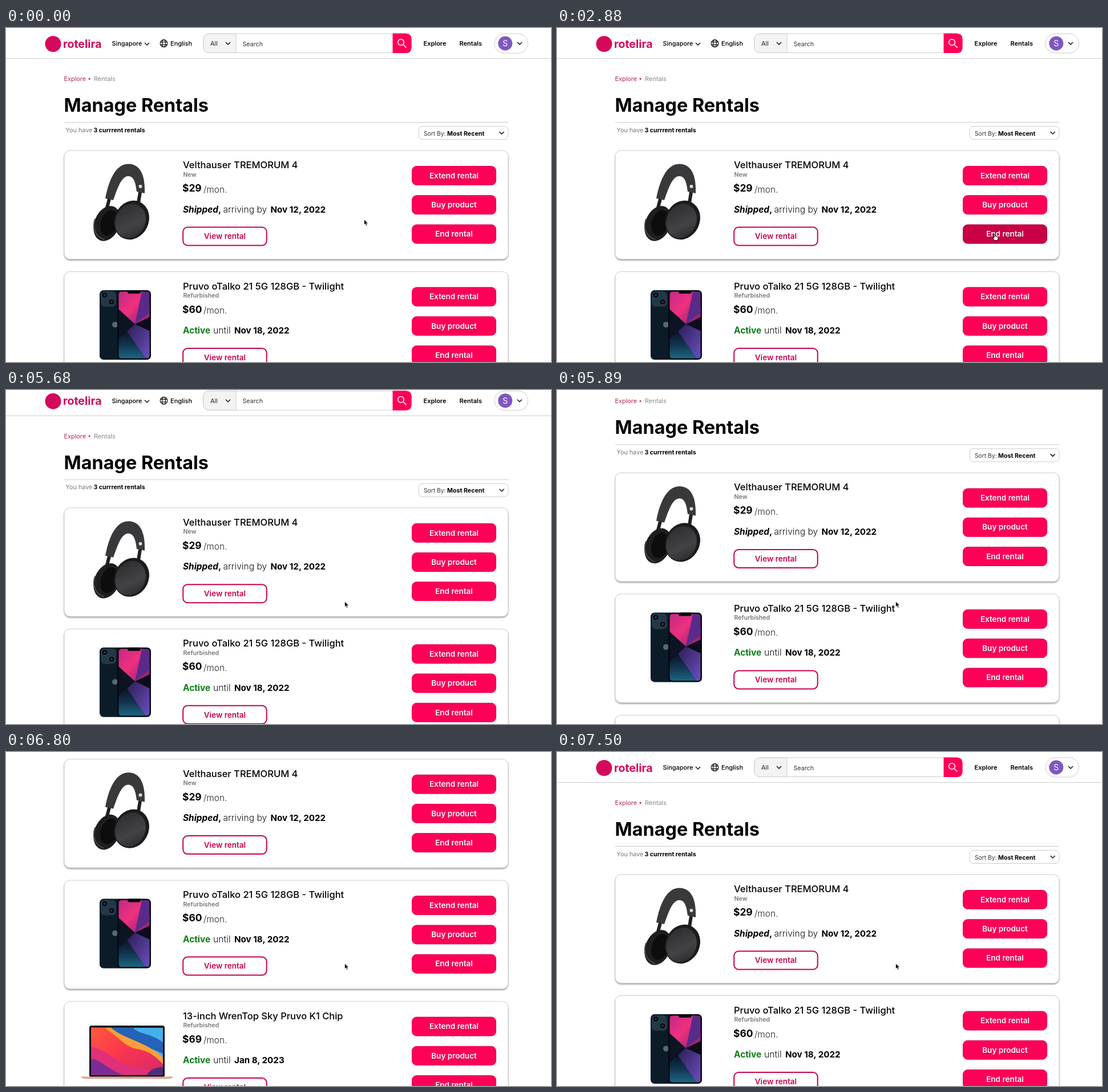
Write an HTML page that moves like this. It is 955x586 px and loops after 8000 ms.

```html
<!DOCTYPE html>
<html lang="en">
<head>
<meta charset="utf-8">
<title>Manage Rentals</title>
<style>
  html, body { margin: 0; width: 100%; height: 100%; overflow: hidden; background: #fff; }
  svg { display: block; }
  text { font-family: Inter, "Open Sans", sans-serif; white-space: pre; }
  .line { fill: none; stroke: #ccc; }
  .chev { fill: none; stroke: #111; stroke-width: 1.5; }
  .solid rect { fill: #ff0059; stroke: #dc004e; }
  .solid.hover rect { fill: #c90046; stroke: #ab003c; }
  .solid text { fill: #fff; text-shadow: 0 1px 1px #0005; }
  .outline rect { fill: #fff; stroke: #c8004f; stroke-width: 2; }
  .outline.hover rect { fill: #f0f0f0; }
  .outline text { fill: #c8004f; }
  .card { fill: #fff; stroke: #ccc; filter: drop-shadow(0 2px 1px #0005); }
</style>
</head>
<body>
<svg id="stage" width="955" height="586" viewBox="0 0 955 586">
  <defs>
    <linearGradient id="cup" x2="1" y2="1">
      <stop stop-color="#29292b"/><stop offset=".6" stop-color="#434345"/><stop offset="1" stop-color="#242426"/>
    </linearGradient>
    <linearGradient id="pink" x2="1" y2="1">
      <stop stop-color="#c02a86"/><stop offset=".45" stop-color="#f0307f"/><stop offset="1" stop-color="#7c2470"/>
    </linearGradient>
    <linearGradient id="violet" x2="1" y2="1">
      <stop stop-color="#2c1d52"/><stop offset="1" stop-color="#6a4fc0"/>
    </linearGradient>
    <linearGradient id="teal" y2="1" x2="0">
      <stop stop-color="#0b1526"/><stop offset=".5" stop-color="#123450"/><stop offset="1" stop-color="#1b6680"/>
    </linearGradient>
    <linearGradient id="red" x2="1" y2="1">
      <stop stop-color="#ff5a3c"/><stop offset=".5" stop-color="#f93350"/><stop offset="1" stop-color="#d42a6c"/>
    </linearGradient>
    <clipPath id="lid"><rect x="149" y="46" width="126" height="83"/></clipPath>
  </defs>
  <g id="page"></g>
  <g id="cursor">
    <path id="arrow" d="M0 0V9.6L2.2 7.6L3.8 11.2L5.5 10.5L4 7H7Z" fill="#000" stroke="#fff" stroke-width=".7"/>
    <path id="hand" d="M-1 .6Q0-.6 1 .6V4L5.2 4.8Q6.3 5.2 6 7L5 11H-.6L-3 7.4Q-3.4 5.8-1 6.8Z" fill="#fff" stroke="#111" stroke-width=".9"/>
  </g>
</svg>
<script>
const $ = id => document.getElementById(id);

const text = (x, y, size, weight, str, fill = '#000', extra = '') =>
  `<text x="${x}" y="${y}" font-size="${size}" font-weight="${weight}" fill="${fill}" ${extra}>${str}</text>`;
const rect = (x, y, w, h, r, attrs = '') =>
  `<rect x="${x}" y="${y}" width="${w}" height="${h}" rx="${r}" ${attrs}/>`;
const circle = (x, y, r, attrs) => `<circle cx="${x}" cy="${y}" r="${r}" ${attrs}/>`;
const ellipse = (x, y, rx, ry, turn, fill) =>
  `<ellipse rx="${rx}" ry="${ry}" transform="translate(${x} ${y}) rotate(${turn})" fill="${fill}"/>`;
const path = (d, attrs) => `<path d="${d}" ${attrs}/>`;
const fill = (d, color) => path(d, `fill="${color}"`);
const chevron = (x, y) => path(`M${x - 4} ${y - 2}l4 4l4-4`, 'class="chev"');
const button = (kind, x, y, w, h, label) =>
  `<g class="btn ${kind}">${rect(x, y, w, h, 8)}${text(x + w / 2, y + h / 2 + 4.8, 13.5, 600, label, '', 'text-anchor="middle"')}</g>`;

const header =
  circle(82.5, 28, 14, 'fill="#d5095b"') +
  text(100, 34.5, 19.5, 700, 'rotelira', '#d5095b') +
  text(185.5, 31, 10.9, 500, 'Singapore') + chevron(247, 28) +
  `<g fill="none" stroke="#111" stroke-width="1.2">${circle(276.5, 27, 6.3, '')}
    <ellipse cx="276.5" cy="27" rx="2.9" ry="6.3"/><path d="M270.8 24.7h11.4M270.8 29.3h11.4"/></g>` +
  text(288, 31, 11, 500, 'English') +
  rect(346, 10, 364.5, 33.5, 10, 'class="line"') +
  path('M403 10H356Q346 10 346 20V33.5Q346 43.5 356 43.5H403Z', 'fill="#f3f3f3" stroke="#ccc"') +
  text(358, 31, 11, 400, 'All', '#222') + chevron(389, 27) +
  text(414.5, 31.5, 10.7, 400, 'Search', '#333') +
  fill('M677.5 9.5H700.5Q710.5 9.5 710.5 19.5V34Q710.5 44 700.5 44H677.5Z', '#ff0059') +
  `<g fill="none" stroke="#fff" stroke-width="1.5">${circle(692, 25, 5.3, '')}<path d="M696 29l5.5 5.5"/></g>` +
  text(731.5, 31, 11, 600, 'Explore') + text(794.5, 31, 11, 600, 'Rentals') +
  rect(856, 10, 58.5, 34, 17, 'class="line"') +
  circle(874.8, 27, 12.5, 'fill="#7e57c2"') +
  text(874.8, 32, 14, 400, 'S', '#fff', 'text-anchor="middle"') + chevron(900, 27) +
  path('M0 53.5H955', 'class="line"');

const heading =
  text(101.5, 93, 10.9, 400, 'Explore', '#b3265a') + fill('M145 87l3 2.2l-3 2.2Z', '#a02050') +
  text(154, 93, 10.9, 400, 'Rentals', '#888') +
  text(101.5, 147, 32.4, 700, 'Manage Rentals') +
  path('M102 165.5H880', 'class="line"') +
  text(104.5, 182.7, 10.8, 400, 'You have', '#777') +
  text(153.5, 182.7, 10.6, 700, '3 currrent rentals') +
  rect(723, 172.5, 157, 23, 7, 'class="line"') +
  text(732, 188.5, 10.3, 400, 'Sort By:', '#333') +
  text(773, 188.5, 10.7, 700, 'Most Recent') + chevron(868.7, 184);

// Product pictures, measured from the top of their card.
const headphones =
  fill('M174 84C180 52 192 24 214 23.5C237 23.5 244 46 243 75L229 72C227 54 223 44 213 45C201 47 195 68 188 87Z', '#39393c') +
  path('M181 85L176 104M235 73L232 92', 'fill="none" stroke="#202022" stroke-width="6"') +
  ellipse(177, 128, 22, 32, 22, '#1e1e20') + ellipse(181, 127, 15, 23, 18, '#0d0d0e') +
  path('M156 120C150 138 158 152 172 156', 'fill="none" stroke="#48484a" stroke-width="2"') +
  ellipse(220, 122, 30, 35, 25, '#1b1b1d') + ellipse(218, 123.5, 26, 31, 25, 'url(#cup)') +
  circle(235.5, 63, 3, 'fill="#d8d8d8"');

const phone =
  rect(164, 32.5, 42, 122, 7, 'fill="#0b1c28"') +
  rect(166, 34.5, 27, 27, 7, 'fill="#213846"') +
  [[173, 41], [185, 53]].map(([x, y]) =>
    circle(x, y, 5.4, 'fill="#080c12" stroke="#40515d"') + circle(x, y, 2, 'fill="#24384d"')).join('') +
  circle(191, 93, 5, 'fill="#586875"') +
  rect(195, 32.5, 59, 122, 7, 'fill="#06080d"') +
  rect(197.5, 35, 54, 117, 5, 'fill="#0c1424"') +
  fill('M197.5 66V40Q197.5 35 202.5 35H242L251.5 62V80L226 92Z', 'url(#pink)') +
  fill('M238 35H246.5Q251.5 35 251.5 40V72L226 92Z', '#5a2a8a') +
  fill('M251.5 80V104L226 92Z', '#0c0c1c') +
  fill('M226 92L251.5 104V147Q251.5 152 246.5 152H244L212 105Z', 'url(#violet)') +
  fill('M212 105L244 152H202.5Q197.5 152 197.5 147V118Z', 'url(#teal)') +
  rect(213, 32.5, 23, 6, 3, 'fill="#06080d"');

const laptop =
  rect(146, 42.5, 132, 91, 4, 'fill="#101014"') +
  `<g clip-path="url(#lid)">` + rect(149, 46, 126, 83, 0, 'fill="#46b0ea"') +
  fill('M180 46H222C232 58 256 56 275 72V92C250 78 215 76 180 46Z', '#2463b8') +
  fill('M149 46H184C205 66 245 70 275 98V129H149Z', '#ff9d38') +
  fill('M149 46H172C196 60 206 80 232 84C254 88 265 100 275 110V129H149Z', 'url(#red)') +
  fill('M149 80C178 84 196 112 232 117C248 119 256 124 262 129H149Z', '#e0307a') +
  fill('M149 100C168 104 180 120 205 129H149Z', '#7a2c96') +
  fill('M246 129C254 118 264 116 275 115V129Z', '#4a2f80') + '</g>' +
  fill('M131 132H293Q291 136 283 136H141Q133 136 131 132Z', '#dba99c') +
  rect(200, 132, 24, 1.5, 1, 'fill="#b98579"');

const card = (y, picture, name, state, price, status, date) =>
  `<g transform="translate(0 ${y})">` + rect(102, 0, 778, 190.5, 10, 'class="card"') + picture +
  text(310, 31, 16.5, 500, name) + text(310.5, 45.5, 10.6, 600, state, '#777') +
  text(309, 72, 17.4, 700, price) + text(346, 73.5, 15.4, 300, '/mon.', '#222') +
  status + text(...date) +
  button('outline', 310.2, 134.5, 146.5, 32, 'View rental') +
  ['Extend rental', 'Buy product', 'End rental'].map((label, i) =>
    button('solid', 711.5, 27.5 + 51.3 * i, 147, 33, label)).join('') + '</g>';

const shipped = text(310, 108.5, 15.4, 700, '<tspan font-style="italic">Shipped</tspan>,') +
  text(380.5, 108.5, 15.6, 300, 'arriving by', '#111');
const active = text(310, 108.5, 15.4, 700, 'Active', '#0a7d14') + text(363, 108.5, 15.8, 300, 'until', '#111');

$('page').innerHTML = header + heading +
  card(215, headphones, 'Velthauser TREMORUM 4', 'New', '$29', shipped, [463.5, 108.5, 15.2, 700, 'Nov 12, 2022']) +
  card(427.5, phone, 'Pruvo oTalko 21 5G 128GB - Twilight', 'Refurbished', '$60', active, [400, 108.5, 15.2, 700, 'Nov 18, 2022']) +
  card(640, laptop, '13-inch WrenTop Sky Pruvo K1 Chip', 'Refurbished', '$69', active, [400, 108.5, 15.2, 700, 'Jan 8, 2023']);

const buttons = [...document.querySelectorAll('.btn')];

// Smooth ramp from 0 to 1; skew shifts its midpoint.
function ramp(t, from, to, skew = 1) {
  const p = Math.min(1, Math.max(0, (t - from) / (to - from))) ** skew;
  return p * p * (3 - 2 * p);
}

// Pointer moves: start, end, target x, target y, downward bow.
const moves = [
  [430, 1060, 768, 260, 0],
  [1620, 2180, 767, 310, 0],
  [2530, 2880, 767, 361.5, 0],
  [3300, 3790, 419, 369.5, 22],
  [4560, 5190, 593.5, 371, 0]
];

function pointer(t) {
  let x = 627.5, y = 336;
  for (const [from, to, tx, ty, bow] of moves) {
    const p = ramp(t, from, to);
    x += (tx - x) * p;
    y += (ty - y) * p + bow * Math.sin(Math.PI * p);
  }
  return [x, y];
}

function draw() {
  const now = performance.now() % 8000;
  const t = now < 500 ? 0 : 500 + Math.floor((now - 500) / 70) * 70;
  const scroll = 202.4 * (ramp(t, 5610, 6450, .847) - ramp(t, 6800, 7500, 1.09));
  const [x, y] = pointer(t);
  $('page').setAttribute('transform', `translate(0 ${-scroll})`);
  $('cursor').setAttribute('transform', `translate(${x} ${y})`);

  let over = false;
  for (const b of buttons) {
    const r = b.firstChild.getBoundingClientRect();
    const hit = x > r.left && x < r.right && y > r.top && y < r.bottom;
    b.classList.toggle('hover', hit);
    over ||= hit;
  }
  $('arrow').style.display = over ? 'none' : '';
  $('hand').style.display = over ? '' : 'none';
  requestAnimationFrame(draw);
}
draw();
</script>
</body>
</html>
```
